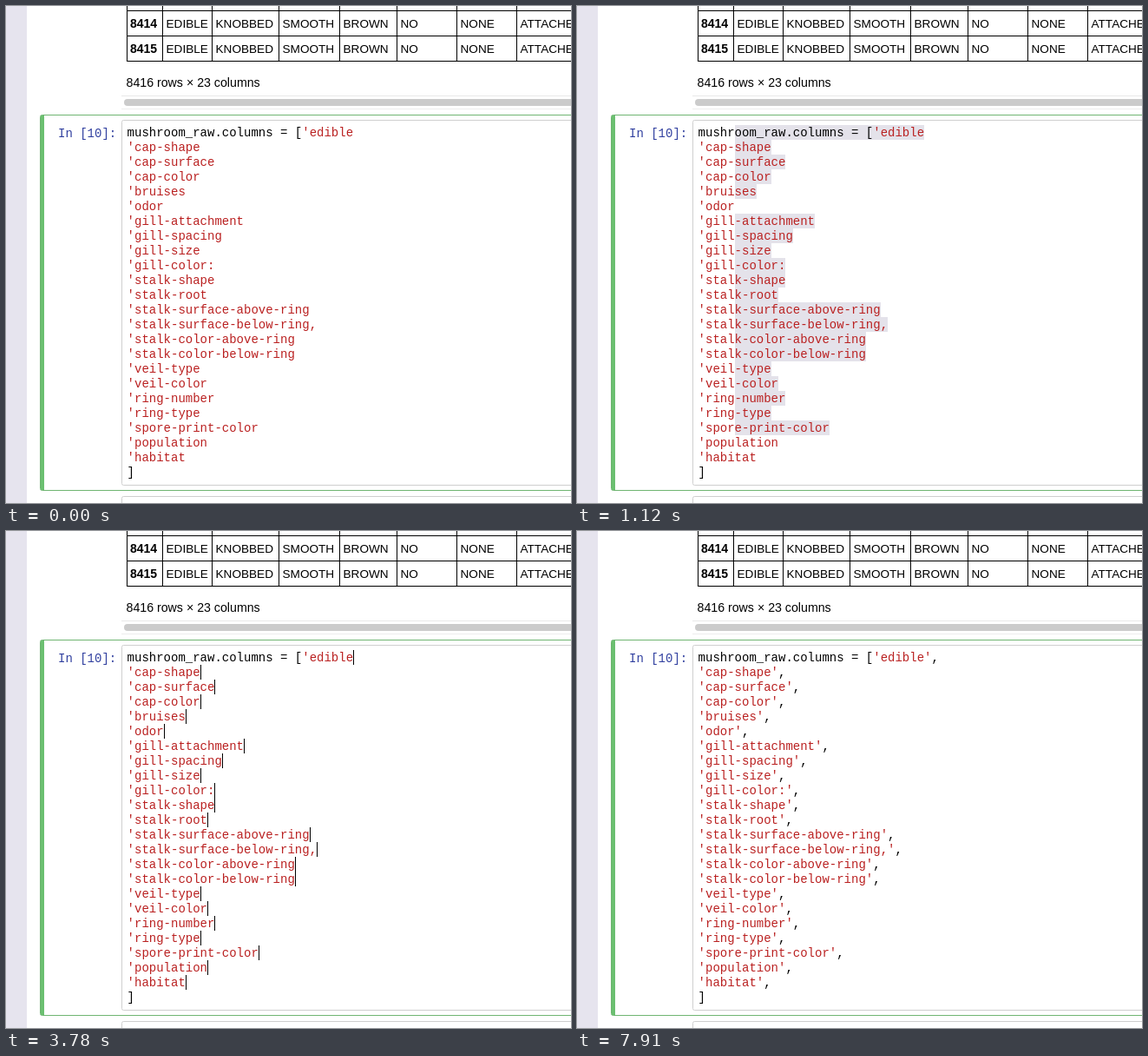
An HTML page for the animation above (8.05 s loop, 651 by 572 pixels).

```html
<!DOCTYPE html>
<html lang="en">
<head>
<meta charset="utf-8">
<style>
html, body { margin: 0; width: 100%; height: 100%; overflow: hidden; background: #fff; }
svg { display: block; }
text { font: 14px "Liberation Sans", Arial, sans-serif; }
.note { font-size: 14.2px; }
.cell { font-size: 13.6px; }
.bold { font-weight: bold; }
.code { font-family: "Liberation Mono", "Courier New", monospace; }
.str { fill: #ba2121; }
.prompt { fill: #303f9f; }
</style>
</head>
<body>
<svg id="stage" width="651" height="572" viewBox="0 0 651 572"></svg>
<script>
const LOOP = 8050, X0 = 139.6, Y0 = 137, CHAR = 8.4, ROW = 17;
const HEAD = "mushroom_raw.columns = [";
const names = ("edible cap-shape cap-surface cap-color bruises odor gill-attachment gill-spacing " +
  "gill-size gill-color: stalk-shape stalk-root stalk-surface-above-ring stalk-surface-below-ring, " +
  "stalk-color-above-ring stalk-color-below-ring veil-type veil-color ring-number ring-type " +
  "spore-print-color population habitat").split(" ");
const lengths = names.map((n, i) => n.length + 1 + (i ? 0 : HEAD.length)).concat(1);
const LAST = names.length - 1;

// Block selection: [start ms, first column, last row]
const selections = [
  [770, 27, 0], [840, 19, 2], [910, 14, 7], [980, 10, 12], [1050, 7, 16], [1120, 5, 20],
  [1190, 0, LAST + 1], [1960, 0, LAST], [2100, 1, LAST], [2450, 0, LAST]
];
// Carets: [start ms, last row with a caret, -1 for none]
const carets = [
  [0, -1], [420, 0], [770, -1], [3780, LAST], [4340, -1], [4900, LAST],
  [5740, -1], [6230, LAST], [6790, -1], [7350, LAST], [7910, -1]
];

const stage = document.getElementById("stage");
function add(parent, tag, attrs, content) {
  const el = document.createElementNS("http://www.w3.org/2000/svg", tag);
  for (const key in attrs) el.setAttribute(key, attrs[key]);
  if (content) el.textContent = content;
  return parent.appendChild(el);
}
const rect = (x, y, width, height, fill, parent = stage) =>
  add(parent, "rect", { x, y, width, height, fill });
const label = (x, y, cls, content) => add(stage, "text", { x, y, class: cls }, content);
const frame = (x, y, height, stroke) => add(stage, "rect",
  { x, y, width: 640, height, rx: 2, fill: "#fff", stroke });

// Page and table
rect(0, 0, 24, 572, "#e6e4ee");
const columns = [139, 180, 237, 314, 384, 450, 519, 588];
for (const x of columns) rect(x, 0, 1, 64, "#000");
for (const y of [5, 34, 63]) rect(139, y, 512, 1, "#000");
["8414", "8415"].forEach((id, r) => {
  const row = [id, "EDIBLE", "KNOBBED", "SMOOTH", "BROWN", "NO", "NONE", "ATTACHED"];
  row.forEach((s, i) => label(columns[i] + (i ? 4.5 : 4), 25 + 29 * r, i ? "cell" : "bold", s));
});
label(138.5, 93, "note", "8416 rows × 23 columns");

// Scroll bar
rect(133, 103, 518, 1, "#e8e8e8");
rect(133, 118, 518, 1, "#ededed");
add(stage, "rect", { x: 136, y: 107, width: 540, height: 8, rx: 4, fill: "#cbcbcb" });

// Notebook cells
frame(39.5, 125.5, 432, "#6fb572");
rect(40, 126, 4, 431, "#6bc070");
frame(133.5, 131.5, 420, "#cfcfcf");
frame(133.5, 564.5, 40, "#cfcfcf");
label(60, 151, "code prompt", "In [10]:");

const selLayer = add(stage, "g", {});
const baseline = row => Y0 + 13 + row * ROW;
const lines = names.map((name, i) => {
  const line = label(X0, baseline(i), "code", "");
  if (!i) add(line, "tspan", {}, HEAD);
  return { name, str: add(line, "tspan", { class: "str" }), comma: add(line, "tspan", {}) };
});
label(X0, baseline(LAST + 1), "code", "]");
const caretLayer = add(stage, "g", {});

const colX = col => Math.round(X0 + col * CHAR);
const current = (list, t) => list.filter(item => item[0] <= t).pop();

function render(t) {
  const quote = t >= 5180, comma = t >= 6230;
  for (const line of lines) {
    line.str.textContent = "'" + line.name + (quote ? "'" : "");
    line.comma.textContent = comma ? "," : "";
  }

  selLayer.replaceChildren();
  if (t >= 770 && t < 3780) {
    const [, col, last] = current(selections, t);
    for (let r = 0; r <= last; r++) {
      const width = colX(lengths[r]) - colX(col);
      if (width > 0) rect(colX(col), Y0 + r * ROW, width, ROW, "#e4e2ea", selLayer);
    }
  }

  caretLayer.replaceChildren();
  const last = current(carets, t)[1];
  for (let r = 0; r <= last; r++)
    rect(colX(lengths[r] + quote + comma), Y0 + r * ROW, 1, ROW, "#000", caretLayer);
}

const start = performance.now();
function tick() {
  render((performance.now() - start) % LOOP);
  requestAnimationFrame(tick);
}
tick();
</script>
</body>
</html>
```
